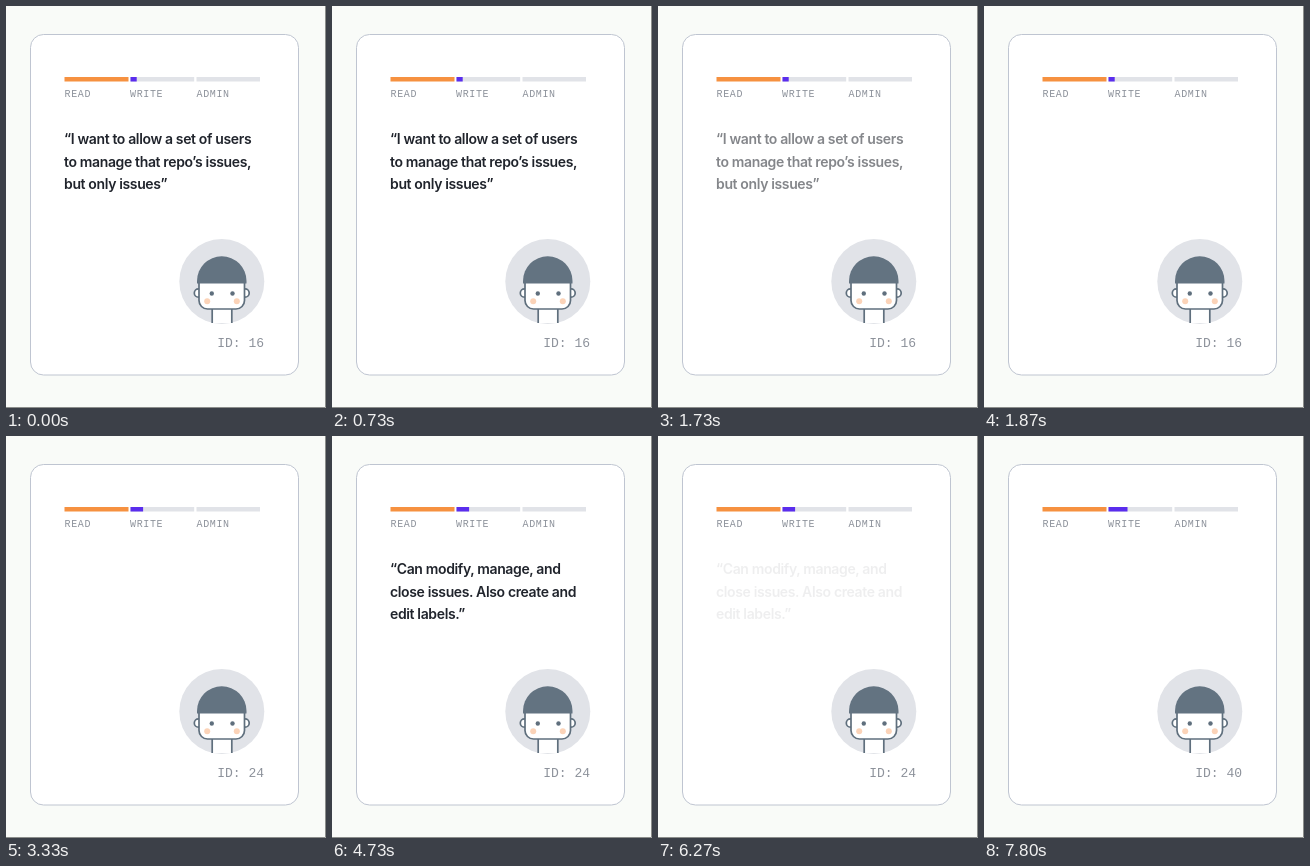
Recreate the animation shown at these times as an HTML page. Size 320 px wide and 402 px high, loop 8 s.

```html
<!DOCTYPE html>
<html lang="en">
<head>
<meta charset="utf-8">
<title>Permission card</title>
<style>
  html, body { margin: 0; height: 100%; overflow: hidden; background: #f9fbf8; }
  svg { display: block; width: 100vw; height: 100vh; }
  .mono { font-family: "Liberation Mono", monospace; fill: #8d929b; }
  .label { font-size: 10px; letter-spacing: .65px; }
  .id { font-size: 13px; text-anchor: end; }
  .quote { font: 600 14px Inter, sans-serif; letter-spacing: -.36px; fill: #20242c; }
  .line { fill: none; stroke: #5f6f7d; stroke-width: 1.7; }
</style>
</head>
<body>
<svg viewBox="0 0 320 402">
  <path d="M319.5 0V401.5H0" fill="none" stroke="#8c8e8c"/>
  <rect x="24.5" y="28.5" width="268" height="340.5" rx="13" fill="#fff" stroke="#bfc5d1"/>

  <g fill="#e1e3e8">
    <rect x="58.5" y="71" width="64" height="4.5" fill="#f69140"/>
    <rect x="124.5" y="71" width="63.7" height="4.5"/>
    <rect x="190.5" y="71" width="63.5" height="4.5"/>
    <rect id="progress" x="124.5" y="71" height="4.5" fill="#5a2ded"/>
  </g>
  <g class="mono label">
    <text x="58.5" y="91">READ</text>
    <text x="124" y="91">WRITE</text>
    <text x="190.5" y="91">ADMIN</text>
  </g>

  <g id="quote" class="quote">
    <text x="58" y="138"></text>
    <text x="58" y="160.5"></text>
    <text x="58" y="183"></text>
  </g>

  <circle cx="215.8" cy="275.5" r="42.5" fill="#e1e3e8"/>
  <path d="M206.2 302V317H225.8V302" fill="#fff"/>
  <path class="line" d="M206.2 303V317M225.8 303V317"/>
  <g class="line" style="fill:#fff">
    <circle cx="192.5" cy="287" r="4.2"/>
    <circle cx="239" cy="287" r="4.2"/>
    <path d="M193 276V294.5a8.5 8.5 0 0 0 8.5 8.5H230a8.5 8.5 0 0 0 8.5 -8.5V276Z"/>
  </g>
  <path d="M191 277.5V275a24.75 24.75 0 0 1 49.5 0V277.5Z" fill="#637381"/>
  <g fill="#5f6f7d"><circle cx="205.8" cy="287.5" r="2.2"/><circle cx="226.5" cy="287.5" r="2.2"/></g>
  <g fill="#fbd3b8"><circle cx="201.2" cy="295.2" r="3"/><circle cx="230.8" cy="295.2" r="3"/></g>

  <text id="count" class="mono id" x="258" y="341"></text>
</svg>
<script>
const LOOP = 8000, FPS = 15;
const progress = document.getElementById("progress");
const count = document.getElementById("count");
const quote = document.getElementById("quote");
const quotes = [
  ["“I want to allow a set of users", "to manage that repo’s issues,", "but only issues”"],
  ["“Can modify, manage, and", "close issues. Also create and", "edit labels.”"],
];

const clamp = v => Math.min(1, Math.max(0, v));
const easeOut = v => 1 - (1 - clamp(v)) ** 2;

function opacityAt(t) {
  if (t < 4060) return 1 - clamp((t - 1630) / 230);
  return t < 7590 ? Math.max(.07, 1 - clamp((t - 6020) / 260)) : 0;
}

function draw(now) {
  // The picture advances on a 15 fps clock.
  const t = Math.floor(((now % LOOP) + 4) * FPS / 1000) * 1000 / FPS;
  const width = 6.2 + 6.4 * easeOut((t - 3140) / 190) + 6.4 * easeOut((t - 7540) / 250);
  progress.setAttribute("width", width);
  count.textContent = "ID: " + (t < 3190 ? 16 : t < 7590 ? 24 : 40);
  const lines = quotes[t < 4060 ? 0 : 1];
  [...quote.children].forEach((line, i) => line.textContent = lines[i]);
  quote.setAttribute("opacity", opacityAt(t));
  requestAnimationFrame(() => draw(performance.now() - start));
}
const start = performance.now();
draw(0);
</script>
</body>
</html>
```
